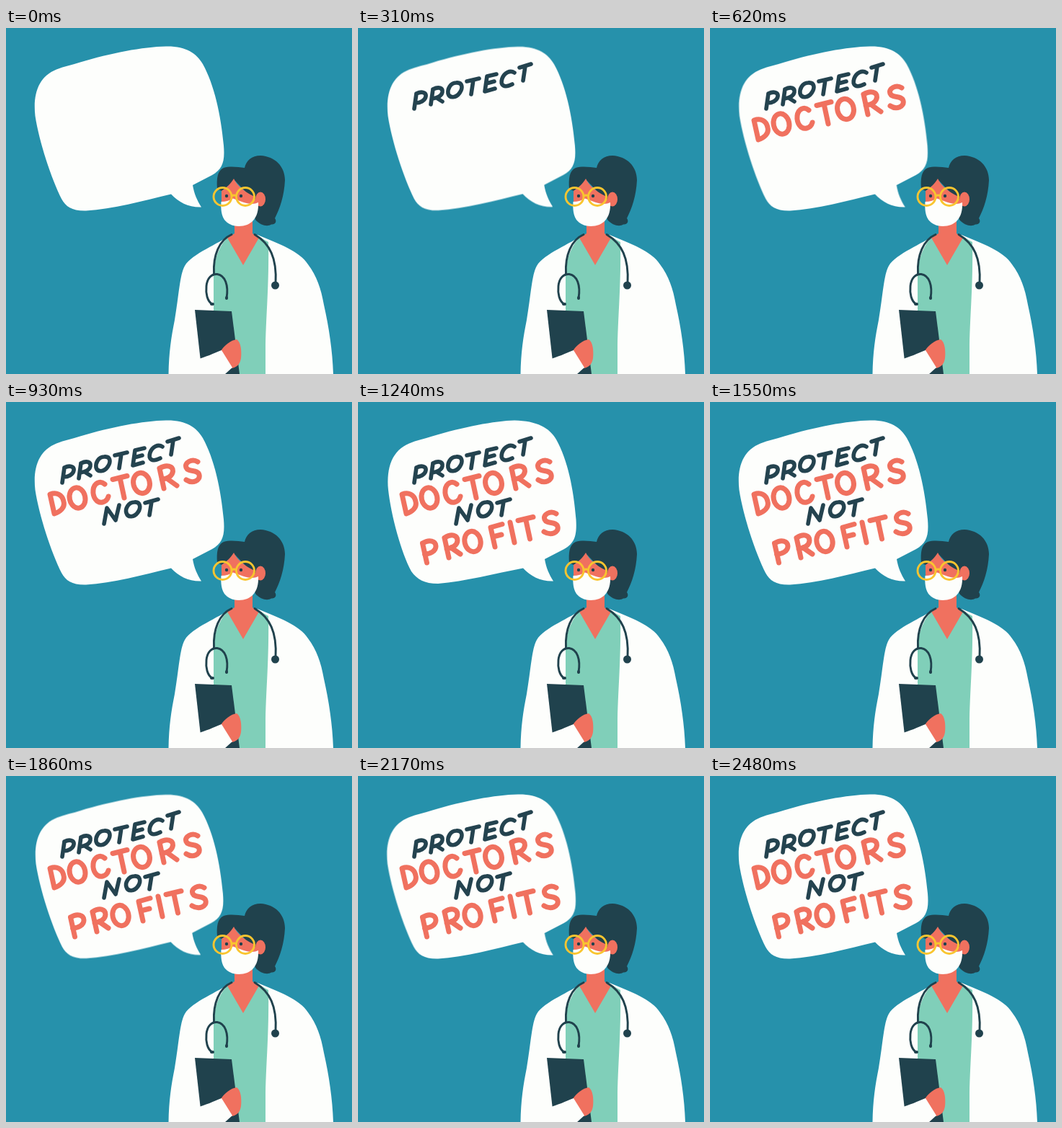
These frames come from a looping animation (480x480 px, 2790 ms). An HTML page:

```html
<!DOCTYPE html>
<html lang="en">
<head>
<meta charset="utf-8">
<title>Protect doctors not profits</title>
<style>
html, body { margin: 0; width: 100%; height: 100%; overflow: hidden; background: #2691ab; }
svg { display: block; width: 100%; height: 100%; }
.white { fill: #fdfefc; }
.dark { fill: #20424d; }
.skin { fill: #f0715f; }
.mint { fill: #80cfb9; }
.line { fill: none; stroke: #20424d; stroke-width: 2.9; stroke-linecap: round; stroke-linejoin: round; }
.frames { stroke: #f9c530; }
.word { fill: none; stroke: #24434f; stroke-width: 5.6; stroke-linecap: round; stroke-linejoin: round; }
.red { stroke: #f0715f; stroke-width: 7; }

.bubble, .word { animation: 2790ms step-end infinite; }
.bubble { animation-name: wobble; transform-origin: 171px 140px; }
.round { visibility: hidden; animation-name: swap; }
.w1 { animation-name: show1; }
.w2 { animation-name: show2; }
.w3 { animation-name: show3; }
.w4 { animation-name: show4; }
@keyframes show1 { 0% { opacity: 0 } 11.111%, 100% { opacity: 1 } }
@keyframes show2 { 0% { opacity: 0 } 22.222%, 100% { opacity: 1 } }
@keyframes show3 { 0% { opacity: 0 } 33.333%, 100% { opacity: 1 } }
@keyframes show4 { 0% { opacity: 0 } 44.444%, 100% { opacity: 1 } }
@keyframes wobble {
  0%, 33.333%, 55.555%, 88.888% { transform: none; visibility: visible }
  11.111%, 66.666% { transform: scale(.992, .996) }
  22.222%, 77.777% { transform: scale(.997, 1) }
  44.444% { visibility: hidden }
}
@keyframes swap { 0%, 55.555%, 100% { visibility: hidden } 44.444% { visibility: visible } }
</style>
</head>
<body>
<svg viewBox="0 0 480 480" role="img" aria-label="A doctor in a mask says: Protect doctors not profits">
  <rect width="480" height="480" fill="#2691ab"/>

  <path class="bubble white" d="M103 47.500C145 35 190 26 222 25.500C250 25 264 35 273 50C289 79 298 120 302 163C304 186 300 196 286 204L259 218C261 230 265 239 271 248.500C253 249 240 242 229 230.500C190 240 148 251 111 253.500C92 254 83 248 77 237C63 209 46 158 40.500 122C37 90 46 67 70 57.500C81 53 92 51 103 47.500Z"/>
  <path class="bubble round white" d="M103 47.500C145 35 190 26 217 25.500C248 26 266 36 275 52C291 81 299 120 302.500 163C304 186 300 196 286 204L259 218C261 230 265 239 271 248.500C253 249 240 242 229 230.500C190 238 148 249 111 252C92 252 82 246 74 235C60 209 46 158 42 122C39 90 48 67 71 57.500C81 53 92 51 103 47.500Z"/>

  <g class="word w1" aria-label="PROTECT">
    <path d="M81 91L78 112M81 91C89 87 95 90 94 95C93 101 86 104 80 104"/>
    <path d="M104 85L101 106M104 85C112 81 118 83 117 89C116 94 110 97 103 98M109 97L117 102"/>
    <path d="M136 76C128 76 124 85 125 91C127 98 136 97 141 90C146 83 145 75 136 76Z"/>
    <path d="M151 74L168 70M160 72L157 92"/>
    <path d="M192 64L179 67L176 88L190 84M178 77L189 74"/>
    <path d="M217 62C211 58 203 62 200 70C197 79 202 84 214 78"/>
    <path d="M224 55L240 50M232 53L229 73"/>
  </g>

  <g class="word red w2" aria-label="DOCTORS">
    <path d="M61 128L67 155C76 152 82 146 80 138C78 128 70 125 61 128Z"/>
    <ellipse cx="99" cy="133" rx="10.800" ry="14.300" transform="rotate(-13 99 133)"/>
    <path d="M137 114C130 108 122 113 121 122C120 132 126 141 134 139C138 138 141 135 142 131"/>
    <path d="M148 107.500L168 102.500M158 105L164 133"/>
    <ellipse cx="188" cy="112.500" rx="11.300" ry="14.300" transform="rotate(-13 188 112.500)"/>
    <path d="M213 92L219 120M213 92C223 86 232 89 231.500 96C231 103 223 107 216 107M223 106L237 116"/>
    <path d="M266 83C258 78 247 84 250 91C253 98 266 93 268 101C270 109 259 114 250 108"/>
  </g>

  <g class="word w3" aria-label="NOT">
    <path d="M136 169L140 147L152 164L157 143"/>
    <path d="M178 139C170 139 165 148 167 154C169 161 178 160 183 153C188 146 186 138 178 139Z"/>
    <path d="M193 140L211 135M202 138L199 157"/>
  </g>

  <g class="word red w4" aria-label="PROFITS">
    <path d="M89.500 196L95.500 223M89.500 196C99 190 108 193 108 200C108 207 100 211 92.500 211"/>
    <path d="M120 188.500L126 216M120 188.500C130 182 138 185 138 192C138 199 130 203 123 203.500M129 202L142 211"/>
    <ellipse cx="159" cy="193.500" rx="11" ry="14.300" transform="rotate(-13 159 193.500)"/>
    <path d="M200 169.500L184 174L190 201M187 187L199 184"/>
    <path d="M211 167L217 195"/>
    <path d="M222 164.500L243 159.500M232.500 162L238.500 190"/>
    <path d="M275 155C267 150 256 156 259 163C262 170 275 165 277 173C279 181 268 186 258 180"/>
  </g>

  <!-- hair and face -->
  <path class="dark" d="M293 223C292 209 293 198 302 194C311 191 322 193 331 194C333 184 341 177 353 177C373 178 387 192 387 211C386 233 380 250 373 264C376 268 374 273 368 272.500C363 276 353 274 346 266L335 230L318 212L299 226Z"/>
  <path class="skin" d="M316 209C312 216 305 222 299 226V250H348V241L343 233C331 227 321 219 316 209Z"/>
  <ellipse class="skin" cx="353" cy="237.500" rx="7" ry="10"/>

  <!-- coat and shirt -->
  <path class="white" d="M311 287C296 299 258 313 248 330C241 342 240 370 234 405C229 430 226 450 225.500 480H454C453 448 448 415 441 384C437 361 431 344 419 328C408 310 378 299 349 287Z"/>
  <path class="mint" d="M309 289C299 298 290 315 288 337V480H360V440C361 395 365 355 364 297L350 289Z"/>
  <path class="skin" d="M317 266H342V285L351 291L329 329L307 291L317 285Z"/>

  <path class="white" d="M298.500 241C305 241 311 239 315 236.500C327 241 340 247 350 242C351 264 340 275 323 275C304 274 297 263 298.500 241Z"/>
  <circle class="dark" cx="306" cy="233" r="2.200"/>
  <circle class="dark" cx="326" cy="233" r="2.200"/>
  <g class="line frames">
    <circle cx="300.500" cy="234" r="12.500"/>
    <circle cx="332" cy="234" r="12.500"/>
    <path d="M313 233Q316 231 319.500 233"/>
  </g>

  <!-- stethoscope -->
  <path class="line" d="M313 286.500C296 294 287 315 288.500 341M345 286.500C366 299 376 319 374 354"/>
  <path class="line" d="M286 383C279 379 277 368 278 358C279 347 285 341 293 341.500C304 343 309 357 306 375"/>
  <path class="line" style="stroke-width:4" d="M285 383H287M306 374V375"/>
  <circle class="dark" cx="373.500" cy="357" r="5.500"/>

  <!-- clipboard and hand -->
  <path class="dark" d="M262 391L313 393L324 480H272Z"/>
  <path class="skin" d="M298 448C303 440 312 433 320 432C326 436 327 448 326 458C325 466 320 471 313 472Z"/>
  <path class="white" d="M264 460C276 457 289 451 299 447L314 471L304 480H260Z"/>
</svg>
</body>
</html>
```
